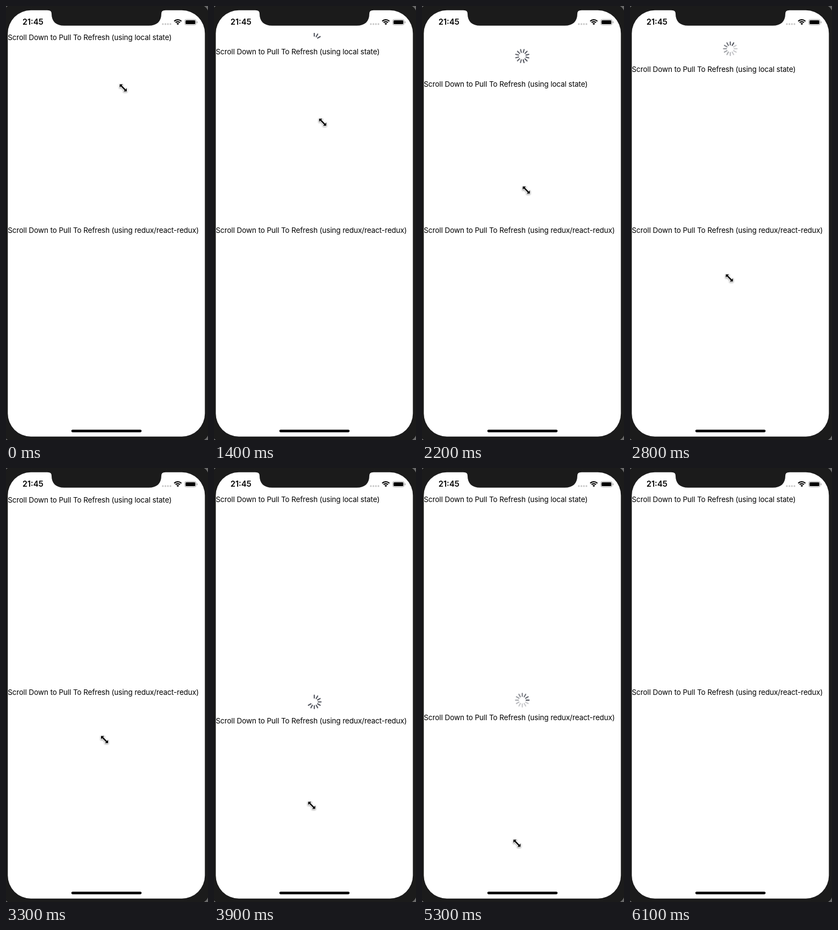
These frames come from a looping animation (368x790 px, 7.2 s). An HTML page with a canvas:

```html
<!DOCTYPE html>
<html lang="en">
<head>
<meta charset="utf-8">
<title>Pull to refresh</title>
<style>
  html, body { margin: 0; width: 100%; height: 100%; overflow: hidden; background: #1b1b1b; }
  canvas { display: block; width: 368px; height: 790px; }
</style>
</head>
<body>
<canvas id="stage"></canvas>
<script>
const W = 368, H = 790, LOOP = 7200, STEP = 100;
const BEZEL = '#1b1b1b';

// Pull gesture: distances in px, times in ms after the drag starts
const REST = 57.6, PULL_SPEED = 0.143;
const REFRESH = 480, RELEASE = 800, END = 1610, CLOSE = 500;
const PEAK = PULL_SPEED * RELEASE;

const LISTS = [
  { label: 'Scroll Down to Pull To Refresh (using local state)', top: 49, dragAt: 1220 },
  { label: 'Scroll Down to Pull To Refresh (using redux/react-redux)', top: 400, dragAt: 3540 }
];

// Pointer way points: time, x, y
const POINTER = [
  [0, 213.5, 149], [200, 203, 143.5], [900, 199.5, 138], [1200, 199, 142],
  [1400, 198, 211.5], [1900, 191, 320], [2200, 190, 335], [2700, 182, 508],
  [2800, 181, 495], [3500, 179, 494], [3900, 178, 614], [4300, 173, 683],
  [5300, 173, 683], [5600, 150, 763], [6000, 9, 395]
];

const canvas = document.getElementById('stage');
const dpr = window.devicePixelRatio || 1;
canvas.width = W * dpr;
canvas.height = H * dpr;
const ctx = canvas.getContext('2d');

const clamp = v => Math.min(1, Math.max(0, v));
const mix = (a, b, p) => a + (b - a) * p;
const smooth = p => p * p * (3 - 2 * p);

function pullOffset(age) {
  if (age <= 0) return 0;
  if (age < RELEASE) return age * PULL_SPEED;
  if (age < END) return mix(REST, PEAK, (1 - (age - RELEASE) / (END - RELEASE)) ** 3);
  return REST * (1 - smooth(clamp((age - END) / CLOSE)));
}

function pointerAt(t) {
  const next = POINTER.findIndex(k => k[0] > t);
  if (next < 0) return POINTER[POINTER.length - 1].slice(1);
  const [ta, xa, ya] = POINTER[next - 1], [tb, xb, yb] = POINTER[next];
  const p = (t - ta) / (tb - ta);
  return [mix(xa, xb, p), mix(ya, yb, p)];
}

function box(x, y, w, h, r, color) {
  ctx.beginPath();
  ctx.roundRect(x, y, w, h, r);
  ctx.fillStyle = color;
  ctx.fill();
}

function drawPhone() {
  ctx.fillStyle = '#6a6a6a';
  ctx.fillRect(0, 0, W, H);
  box(-6, -3, W + 8, H + 6, 20, BEZEL);
  box(3.3, 7.7, 359, 776, 42, '#fff');

  ctx.beginPath();
  ctx.moveTo(76, 7);
  ctx.lineTo(76, 7.7);
  ctx.quadraticCurveTo(83, 7.7, 83, 14);
  ctx.bezierCurveTo(83, 28, 91, 35.8, 106, 35.8);
  ctx.lineTo(260, 35.8);
  ctx.bezierCurveTo(275, 35.8, 283, 28, 283, 14);
  ctx.quadraticCurveTo(283, 7.7, 290, 7.7);
  ctx.lineTo(290, 7);
  ctx.fillStyle = BEZEL;
  ctx.fill();
  box(119, 771.2, 128, 4.8, 2.4, '#000');
}

function drawStatus() {
  ctx.fillStyle = '#000';
  ctx.font = '600 14.4px Inter, sans-serif';
  ctx.letterSpacing = '0px';
  ctx.fillText('21:45', 30, 34.3);

  for (let i = 0; i < 4; i++) box(284.2 + i * 4.6, 31.3, 3.2, 3.2, 1.6, '#c6c6c6');

  ctx.strokeStyle = '#000';
  ctx.lineWidth = 2.2;
  for (const r of [5.4, 9]) {
    ctx.beginPath();
    ctx.arc(313, 34, r, -Math.PI * 0.76, -Math.PI * 0.24);
    ctx.stroke();
  }
  ctx.beginPath();
  ctx.moveTo(313, 34.5);
  ctx.arc(313, 34.5, 3.4, -Math.PI * 0.75, -Math.PI * 0.25);
  ctx.fillStyle = '#000';
  ctx.fill();

  ctx.strokeStyle = '#a3a3a3';
  ctx.lineWidth = 1;
  ctx.beginPath();
  ctx.roundRect(325.5, 24.5, 21, 10, 3);
  ctx.stroke();
  box(327, 26, 18, 7, 1.6, '#000');
  box(347.6, 27.8, 1.3, 3.6, 0.7, '#a3a3a3');
}

function drawSpinner(top, age, offset) {
  const spin = age - REFRESH;
  const active = spin >= 0;
  const shown = active ? 12 : Math.round((offset - 13) / 4.4);
  const head = Math.floor(spin * 0.012);
  const tail = clamp((spin - 400) / 600);
  const fade = age > END ? clamp(offset / 40) : 1;

  ctx.save();
  ctx.beginPath();
  ctx.rect(3, top, 359, 351);
  ctx.clip();
  ctx.translate(182.7, top + offset / 2);
  // The full ring turns into place when refreshing starts
  if (active) ctx.rotate(-Math.PI * (1 - clamp(spin / 700)) ** 2);
  ctx.strokeStyle = '#52555e';
  ctx.lineWidth = 2.1;
  ctx.lineCap = 'round';
  for (let i = 0; i < shown; i++) {
    const behind = active ? (head - i + 24) % 12 : 0;
    ctx.globalAlpha = fade * (1 - tail * 0.68 * Math.min(1, behind / 8));
    ctx.beginPath();
    ctx.moveTo(0, -7);
    ctx.lineTo(0, -12.3);
    ctx.stroke();
    ctx.rotate(Math.PI / 6);
  }
  ctx.restore();
}

function drawList({ label, top, dragAt }, t) {
  const age = t - dragAt;
  const offset = pullOffset(age);
  if (offset > 0) drawSpinner(top, age, offset);
  ctx.fillStyle = '#000';
  ctx.font = '400 13.3px Inter, sans-serif';
  ctx.letterSpacing = '-0.12px';
  ctx.fillText(label, 3.2, top + 13.4 + offset);
}

function drawPointer(t) {
  if (t > 6000) return;
  const [x, y] = pointerAt(t);
  ctx.save();
  ctx.translate(x, y);
  ctx.beginPath();
  for (const s of [1, -1]) {
    ctx.lineTo(-4.45 * s, -2.65 * s);
    ctx.lineTo(-6.5 * s, -0.6 * s);
    ctx.lineTo(-6.5 * s, -6.5 * s);
    ctx.lineTo(-0.6 * s, -6.5 * s);
    ctx.lineTo(-2.65 * s, -4.45 * s);
  }
  ctx.closePath();
  ctx.lineJoin = 'round';
  ctx.lineWidth = 2;
  ctx.strokeStyle = '#fff';
  ctx.shadowColor = 'rgba(0,0,0,0.45)';
  ctx.shadowBlur = 2.5 * dpr;
  ctx.shadowOffsetY = dpr;
  ctx.stroke();
  ctx.shadowColor = 'transparent';
  ctx.fillStyle = '#000';
  ctx.fill();
  ctx.restore();
}

const start = performance.now();

function frame() {
  const elapsed = (performance.now() - start) % LOOP;
  const t = Math.floor(elapsed / STEP) * STEP;
  ctx.setTransform(dpr, 0, 0, dpr, 0, 0);
  drawPhone();
  drawStatus();
  for (const list of LISTS) drawList(list, t);
  drawPointer(t);
  requestAnimationFrame(frame);
}
frame();
</script>
</body>
</html>
```
